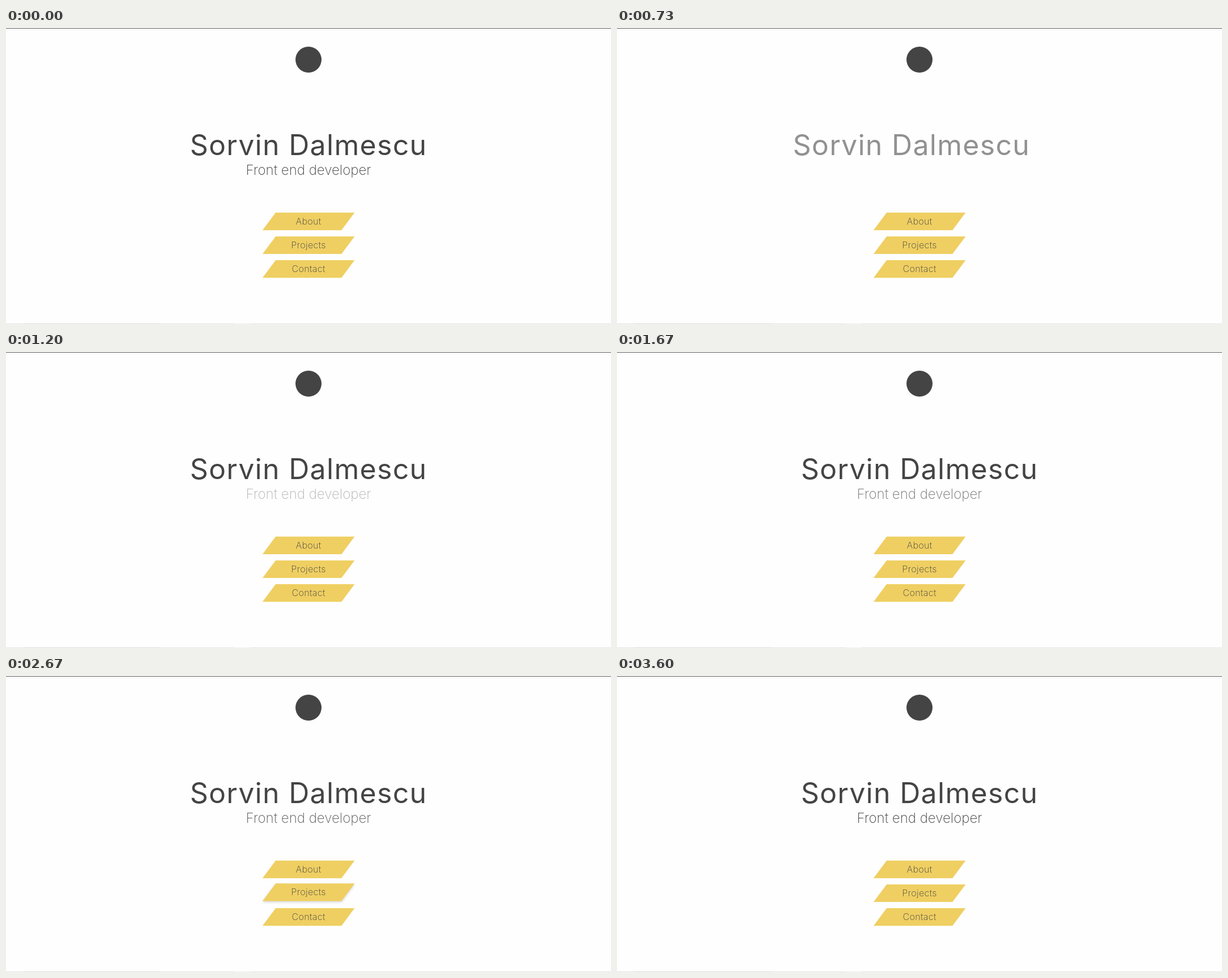
Recreate the animation shown at these times as an HTML page. Size 1068 px wide and 524 px high, loop 4140 ms.

```html
<!DOCTYPE html>
<html lang="en">
<head>
<meta charset="utf-8">
<title>Portfolio landing page</title>
<style>
  html, body { margin: 0; width: 100%; height: 100%; overflow: hidden; background: #fefefe; }
  svg { display: block; width: 100vw; height: 100vh; }
  text {
    font-family: Inter, Lato, sans-serif;
    font-optical-sizing: none;
    text-anchor: middle;
    fill: #444;
  }
  #name { font-size: 50px; font-weight: 400; letter-spacing: 1.3px; }
  #role { font-size: 24px; font-weight: 200; }
  .button text { font-size: 16.2px; font-weight: 200; letter-spacing: .3px; }
  .button polygon { fill: #efcf62; }
</style>
</head>
<body>
<svg id="stage" viewBox="0 0 1068 524">
  <rect width="1068" height="524" fill="#fefefe"/>
  <rect width="1068" height="1" fill="#5c5c5c"/>
  <rect y="523" width="1068" height="1" fill="#e4e4e4"/>
  <rect x="32" y="523" width="240" height="1" fill="#d9d9d9"/>
  <rect x="402" y="523" width="30" height="1" fill="#f0f0f0"/>
  <circle cx="534" cy="56" r="23" fill="#444"/>
  <text id="name" x="534" y="225">Sorvin Dalmescu</text>
  <text id="role" x="534" y="259.5">Front end developer</text>
</svg>
<script>
  const LOOP = 4140;
  const STEP = 200 / 3; // the picture advances 15 times a second
  const RELOAD = 130;
  const HOVER_TIME = 300;
  const LIFT = 2.3;
  const SVG_NS = 'http://www.w3.org/2000/svg';

  const stage = document.getElementById('stage');
  const nameText = document.getElementById('name');
  const roleText = document.getElementById('role');

  const clamp = v => Math.min(1, Math.max(0, v));
  const mix = (a, b, k) => a + (b - a) * k;

  // CSS-style cubic-bezier timing function
  function bezier(x1, y1, x2, y2) {
    const at = (a, b, s) => 3 * a * s * (1 - s) ** 2 + 3 * b * s * s * (1 - s) + s ** 3;
    return x => {
      if (x <= 0 || x >= 1) return clamp(x);
      let lo = 0, hi = 1;
      for (let i = 0; i < 24; i++) {
        const mid = (lo + hi) / 2;
        if (at(x1, x2, mid) < x) lo = mid; else hi = mid;
      }
      return at(y1, y2, lo);
    };
  }
  const ease = bezier(.25, .1, .25, 1);
  const easeOut = bezier(0, 0, .58, 1);

  function add(tag, attrs, parent) {
    const el = document.createElementNS(SVG_NS, tag);
    for (const key in attrs) el.setAttribute(key, attrs[key]);
    return parent.appendChild(el);
  }

  function makeButton(label, y, enter, leave) {
    const group = add('g', { class: 'button' }, stage);
    const shape = add('polygon', {
      points: `476,${y} 615.4,${y} 592.2,${y + 31.2} 452.8,${y + 31.2}`
    }, group);
    add('text', { x: 534, y: y + 21.2 }, group).textContent = label;
    return { group, shape, enter, leave };
  }

  const buttons = [
    makeButton('About', 326.7, 2040, 2290),
    makeButton('Projects', 368.9, 2360, 2610),
    makeButton('Contact', 411.1, 2680, 3300)
  ];

  function drawName(t) {
    const p = t < RELOAD ? 1 : clamp((t - 405) / 800);
    const x = p < .8
      ? mix(-65, 7.8, easeOut(p / .8))
      : mix(7.8, 0, easeOut((p - .8) / .2));
    nameText.setAttribute('opacity', easeOut(p));
    nameText.setAttribute('transform', `translate(${x} 0)`);
  }

  function roleOpacity(t) {
    if (t < RELOAD || t >= 2800) return 1;
    if (t >= 1866) return .87;
    return .75 * ease(clamp((t - 900) / 1000));
  }

  function drawButton({ group, shape, enter, leave }, t) {
    const up = s => ease(clamp((s - enter) / HOVER_TIME));
    const lift = t < leave
      ? up(t)
      : up(leave) * (1 - ease(clamp((t - leave) / HOVER_TIME)));
    group.setAttribute('transform', `translate(0 ${-LIFT * lift})`);
    shape.style.filter = lift > .01
      ? `drop-shadow(0 2px 2px rgba(0,0,0,${.22 * lift}))`
      : 'none';
  }

  function draw(time) {
    const t = Math.floor((time % LOOP + 4) / STEP) * STEP;
    drawName(t);
    roleText.setAttribute('opacity', roleOpacity(t));
    buttons.forEach(b => drawButton(b, t));
  }

  const start = performance.now();
  function tick() {
    draw(performance.now() - start);
    requestAnimationFrame(tick);
  }
  tick();
</script>
</body>
</html>
```
